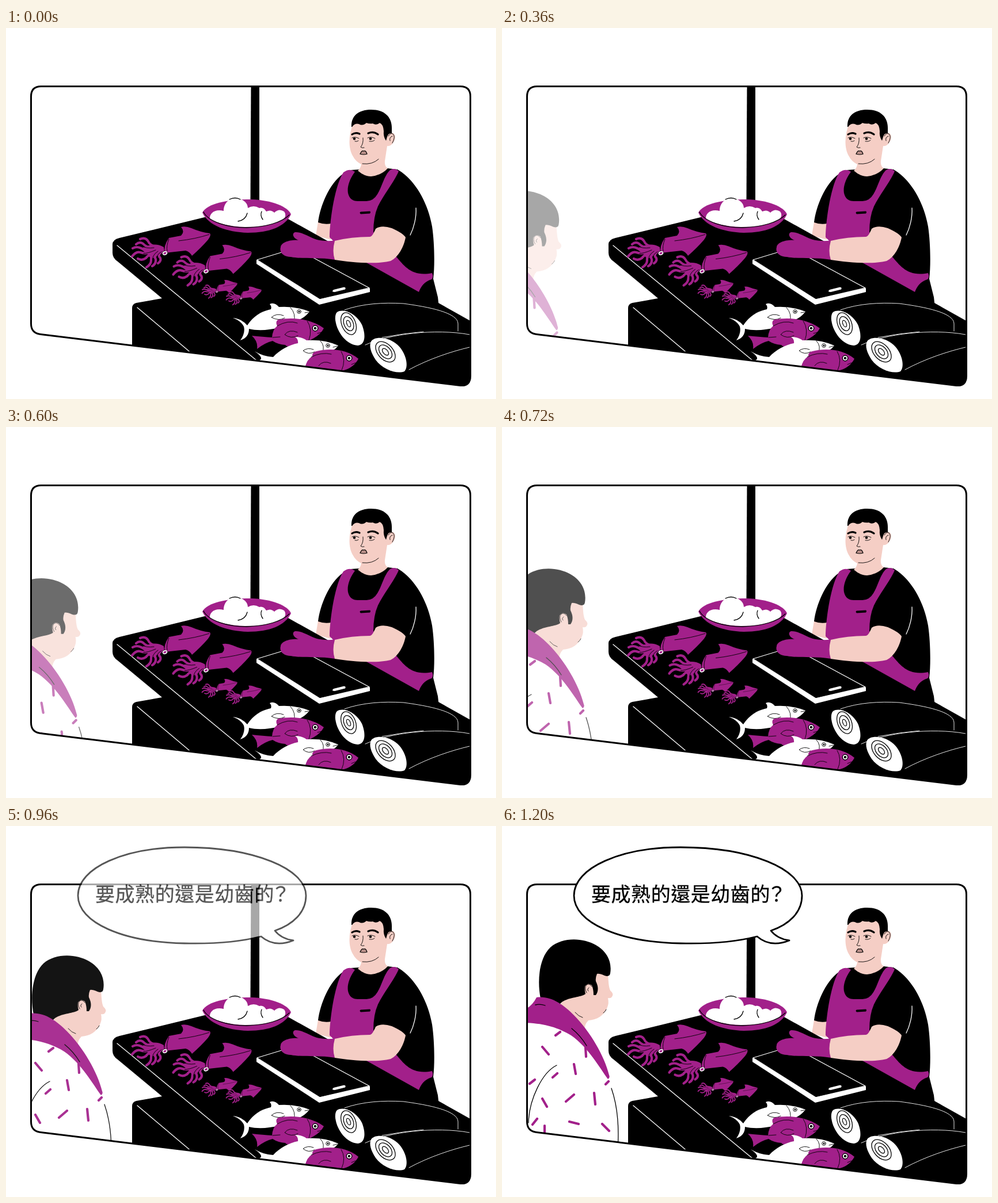
An HTML page for the animation above (2400 ms loop, 851 by 645 pixels).

```html
<!DOCTYPE html>
<html lang="zh-Hant">
<head>
<meta charset="utf-8">
<title>Fish stall</title>
<style>
html, body { margin: 0; width: 100%; height: 100%; overflow: hidden; background: #fff; }
svg { display: block; width: 100vw; height: 100vh; }
.p { fill: #a2208a; }
.s { fill: #f5cec5; }
.w { fill: #fff; }
.k { fill: #000; }
.lk, .lw, .lp { fill: none; stroke-linecap: round; stroke-linejoin: round; stroke-width: 1.3; }
.lk { stroke: #000; }
.lw { stroke: #fff; }
.lp { stroke: #a2208a; stroke-width: 4.2; }
.fine { stroke-width: .9; }
.brow { stroke-width: 3.2; }
.eye { fill: #fff; stroke: #000; stroke-width: 1.4; }
text { font: 500 34px "Noto Sans CJK TC", "Noto Sans CJK", "Noto Sans CJK JP", sans-serif; letter-spacing: .55px; }
</style>
</head>
<body>
<svg viewBox="0 0 851 645">
<defs>
  <path id="panel" d="M61 101.500H789Q806.500 101.500 806.500 119V605Q806.500 623 789 621.500L60 532.500Q43.500 530.500 43.500 514V119Q43.500 101.500 61 101.500Z"/>
  <clipPath id="inside"><use href="#panel"/></clipPath>
  <g id="squid">
    <path class="p" d="M283 365L304 361Q311 354 304 346Q312 344 322 348Q338 355 354 357Q357 360 351 368Q339 382 323 396Q319 389 312 387L276 391Q273 379 283 365Z"/>
    <path class="p" d="M274 381Q262 374 248 378L234 383Q240 390 247 394Q250 402 256 400Q266 394 275 389Z"/>
    <g class="lp">
      <path d="M262 381Q250 378 247 371Q242 363 233 367"/>
      <path d="M260 383Q244 382 238 375Q232 371 226 376"/>
      <path d="M258 386Q244 389 235 383Q227 379 220 383"/>
      <path d="M258 388Q243 394 233 390Q226 388 219 397"/>
      <path d="M260 389Q247 394 243 400Q236 405 229 401"/>
      <path d="M262 390Q251 396 252 404Q252 411 244 416"/>
      <path d="M266 389Q256 395 260 402Q261 410 254 414"/>
      <path d="M271 388Q262 394 268 400Q270 405 264 409"/>
    </g>
    <path class="lk fine" d="M300 370Q328 367 353 359M283 367Q278 379 280 388M257 382Q243 384 236 379M260 386Q246 392 239 392M264 388Q252 396 255 406M270 389Q259 395 264 402"/>
    <ellipse class="k" cx="276" cy="391.500" rx="5" ry="4"/>
    <ellipse class="p" cx="276" cy="391.500" rx="3.600" ry="2.600" stroke="#fff" stroke-width="1.500" transform="rotate(-20 276 391.500)"/>
  </g>
</defs>

<g clip-path="url(#inside)">
  <path class="k" d="M425.500 101H440V302H424.500Z"/>

  <!-- seller -->
  <path class="s" d="M542 337L564 339V368Q550 364 538 361Z"/>
  <path class="k" d="M598 247C567 257 546 305 542 338Q552 342 565 340L640 400L690 450L752 486L750 468L742 436C745 412 744 372 740 345C732 300 708 262 680 246L655 243Z"/>
  <path class="s" d="M603 166C595 185 594 208 602 222Q607 232 617 237Q616 244 611 248Q622 258 634 258Q652 256 663 244Q657 240 658 231L662 205Q668 206 672 200Q679 190 674 184Q670 180 665 184L652 158Z"/>
  <path class="k" d="M600 172C599 152 613 142 634 142C658 142 670 155 670 174L670 183Q664 182 662 189L660 196Q655 189 656 179Q655 167 649 165Q643 170 637 166Q631 167 626 165Q619 171 613 167Q606 165 601 172Z"/>
  <path class="lk fine" d="M664 188Q667 182 672 184Q677 189 671 200M671 188Q665 190 667 196M619 236Q636 238 647 228M620 191Q621 201 616 207Q618 209 622 208M601 191Q606 188 613 192M628 191Q634 188 641 192M606 197Q610 198 612 196M631 197Q637 198 640 195"/>
  <path class="lk brow" d="M601 185Q607 181 614 184M629 183Q638 179 646 185"/>
  <circle class="k" cx="605" cy="192.500" r="2.200"/><circle class="k" cx="633" cy="192.500" r="2.200"/>
  <path d="M615 219Q618 212 621 214Q625 212 627 219Q621 221 615 219Z" fill="#b98f89" stroke="#000" stroke-width="1.200"/>
  <path class="p" d="M586 251Q597 243 606 250C597 262 592 276 594 287Q597 301 611 301H626Q638 301 645 289C654 274 656 258 667 247Q675 242 682 249C674 268 657 288 646 310Q638 328 638 355L668 390L678 398C692 414 705 433 740 426Q743 433 739 437Q722 442 716 462L600 400L562 364C562 340 570 275 586 251Z"/>
  <path class="k" d="M616 319.500L632 318.500Q634 320 632 322.500L616 323.500Q613 321 616 319.500Z"/>
  <path class="lw" d="M712 313C713 330 708 348 702 360"/>

  <!-- table -->
  <path class="k" d="M185 378Q184 368 197 365L345 329L490 332L808 510V630L219 560V487Q219 480 226 478L271 470L194 406Q185 400 185 391Z"/>
  <path class="lw" d="M193 378L434 577M228 486L318 562"/>

  <!-- bowl -->
  <path class="p" d="M341 321C349 305 385 298 425 298C462 299 490 311 495 324C485 345 458 356 420 356C383 355 351 343 341 321Z"/>
  <path class="w" d="M354 332C353 322 363 314 378 318C378 304 388 296 398 296C411 296 420 304 420 313Q430 307 440 313Q447 311 452 319Q460 315 466 321Q474 313 483 319Q488 325 482 333C462 343 440 346 415 346C390 345 370 341 354 332Z"/>
  <path class="lk" d="M343 320C352 337 384 347 418 347C452 346 479 338 492 325M388 298Q398 293 407 298M419 322Q416 334 403 336M444 319Q441 326 446 333"/>

  <use href="#squid"/>
  <use href="#squid" x="71.500" y="31.500"/>
  <use href="#squid" transform="translate(242 282.500) scale(.45)"/>
  <use href="#squid" transform="translate(284 294) scale(.45)"/>

  <!-- board -->
  <path class="k lw" d="M436 403L482 389L520 392L631 452L545 472Z" style="fill:#000"/>
  <path class="w" d="M435 403L545 471.500L632 452.500V459L544 481L435 410Z"/>
  <path class="w" d="M569 455L587 450.500Q591 451 589 454.500L571 459Q564 459 569 455Z"/>

  <!-- hands -->
  <path class="p" d="M572 369C556 372 540 369 532 365C521 360 510 354 502 355C496 357 498 365 508 369C492 368 478 373 477 381C474 391 483 398 495 398C515 402 540 398 572 403Z"/>
  <path class="s" d="M571 370Q566 388 571 403C600 408 645 411 668 405C682 398 691 380 694 364Q690 357 670 348Q652 342 642 349C638 358 636 362 632 363Q600 363 571 370Z"/>

  <!-- small fish -->
  <path class="w" d="M419 517C430 500 445 492 460 489Q462 484 458 480Q466 476 474 485Q502 483 527 493Q519 504 505 509C480 522 447 529 422 523Q422 538 407 543Q416 530 413 519Q408 509 394 504Q410 506 419 517Z"/>
  <path class="lk fine" d="M494 486Q504 497 500 510M482 500Q470 495 461 503Q474 510 484 504M519 495L525 494"/>
  <circle class="lk fine" cx="509" cy="493" r="3.300"/><circle class="k" cx="509" cy="493" r="1.500"/>
  <path class="p" d="M462 538Q463 524 471 518Q467 510 473 507C500 502 530 506 552 522C544 538 523 547 499 551Q490 557 485 551Q472 550 463 544Q450 547 436 558Q438 545 427 535Q447 537 462 538Z"/>
  <path class="lk fine" d="M523 509Q533 524 526 543M471 518Q490 507 506 513M506 529Q492 523 484 533Q495 541 507 535M463 538L476 537M541 531L548 529"/>
  <circle class="eye" cx="537" cy="522" r="4.700"/><circle class="k" cx="537" cy="522" r="2.300"/>
  <path class="w" d="M464 572C476 559 492 551 507 548Q508 541 502 537Q514 537 522 543Q553 541 577 552Q570 563 552 566L530 590L440 578Q449 574 432 562Q446 571 464 572Z"/>
  <path class="lk fine" d="M546 544Q555 553 549 566M534 559Q524 555 516 561Q525 569 536 563M568 555L575 553"/>
  <circle class="lk fine" cx="559" cy="552" r="3.300"/><circle class="k" cx="559" cy="552" r="1.500"/>
  <path class="p" d="M519 592Q522 576 532 571Q531 564 539 562C562 556 592 558 612 575C604 591 588 597 568 598Z"/>
  <path class="lk fine" d="M582 562Q591 577 583 595M530 572Q548 563 565 567M564 583Q551 577 543 587M600 585L607 582"/>
  <circle class="eye" cx="596" cy="574" r="4.700"/><circle class="k" cx="596" cy="574" r="2.300"/>

  <!-- large cuts -->
  <path class="k" d="M585 490C640 472 740 468 805 522V620H700L620 552Z"/>
  <path class="lw fine" d="M588 490C620 479 655 477 690 479C735 485 785 495 785 514V527M624 551C665 532 745 522 805 533M653 538Q690 531 725 528M700 594C735 575 775 562 805 555"/>
  <path class="w" d="M575 494C588 486 611 499 619 518C626 538 622 551 611 552C592 551 575 530 572 508Q571 498 575 494Z"/>
  <path class="w" d="M634 545C641 534 670 538 684 555C696 570 699 589 692 597C680 602 655 595 642 577C634 565 630 553 634 545Z"/>
  <g id="rings"></g>
</g>

<g clip-path="url(#inside)">
  <g id="guest">
    <path class="s" d="M160 254L184 258C185 270 185 279 188 286Q195 292 191 297Q189 300 184 299Q186 308 183 315C177 330 165 337 150 338Q143 345 144 354L100 322L104 300L143 290Q140 276 152 273Z"/>
    <path class="k" d="M67 300C61 270 64 230 84 211C105 193 140 194 163 207C184 219 191 238 188 256Q187 263 178 260Q169 256 165 257Q162 264 163 270Q170 284 163 294H159Q159 284 156 277Q149 271 144 279Q143 285 145 292C137 298 118 297 104 306L98 312Z"/>
    <path class="lk fine" d="M147 290Q142 281 147 276Q152 273 156 279M151 281Q147 284 150 287M127 324Q133 331 140 333M176 325Q180 322 181 319"/>
    <path class="p" d="M30 322Q50 318 60 298C85 295 106 310 125 329C153 357 178 400 186 433Q188 438 184 440C170 421 150 385 120 364C95 349 70 342 30 342Z"/>
    <path class="lk" d="M58 311Q66 309 75 312M121 352Q136 364 147 382M95 416C70 428 47 475 46 516M190 456C199 482 204 515 201 560"/>
    <path id="dashes" class="lp"/>
  </g>
</g>

<use href="#panel" fill="none" stroke="#000" stroke-width="3"/>

<g id="bubble">
  <path d="M443 192C400 203 352 205 310 204C203 202 125 168 125 121C125 72 207 37 310 37C430 37 521 74 521 121C521 150 499 171 467 182Q478 196 499 199Q466 212 443 192Z" fill="#fff" stroke="#000" stroke-width="2.800" stroke-linejoin="round"/>
  <text x="155" y="131" stroke="#000" stroke-width=".3">要成熟的還是幼齒的<tspan dx="-6">？</tspan></text>
</g>
</svg>
<script>
const $ = id => document.getElementById(id);
const LOOP = 2400, STEP = 60, LAST = 20;

// sprinkles on the jacket: start x, y, and direction
const dashes = [
  [93, 364, 8, -6], [70, 384, 11, 13], [145, 385, 1, 16], [125, 414, 3, 17],
  [88, 437, 8, -7], [48, 448, 9, -7], [111, 479, 14, -12], [160, 464, 2, 20],
  [180, 449, 5, -5], [70, 474, 8, 14], [53, 519, 8, -10], [117, 514, 16, 4],
  [174, 518, 12, 12], [74, 521, 0, 12]
];
$("dashes").setAttribute("d", dashes.map(([x, y, dx, dy]) => `M${x} ${y}l${dx} ${dy}`).join(""));

const ring = (x, y, rx, ry, a) =>
  `<ellipse class="lk" cx="${x}" cy="${y}" rx="${rx}" ry="${ry}" transform="rotate(${a} ${x} ${y})"/>`;
$("rings").innerHTML = [[12, 20], [8, 13], [3, 6]].map(([rx, ry]) =>
  ring(595, 514, rx, ry, -22) + ring(659, 563, rx + 1, ry + 1, -42)).join("");

// step, x, y of the walking customer
const walk = [
  [0, -125, 104], [4, -102, 82], [8, -77, 89], [9, -73, 74], [12, -44, 49],
  [14, -35, 29], [16, -19, 28], [18, -9, 11], [20, 0, 0]
];

function place(n) {
  let i = 1;
  while (i < walk.length - 1 && walk[i][0] < n) i++;
  const a = walk[i - 1], b = walk[i], k = (n - a[0]) / (b[0] - a[0]);
  return [1, 2].map(j => a[j] + (b[j] - a[j]) * k);
}

const clamp = v => Math.max(0, Math.min(1, v));
const start = performance.now();

function draw(now) {
  const n = Math.min(LAST, Math.floor(Math.max(0, now - start) % LOOP / STEP));
  const [x, y] = place(n);
  $("guest").setAttribute("transform", `translate(${x} ${y})`);
  $("guest").setAttribute("opacity", clamp(n * .0575));
  $("bubble").setAttribute("opacity", clamp((n - 13.65) * .28));
  requestAnimationFrame(draw);
}
draw(start);
</script>
</body>
</html>
```
